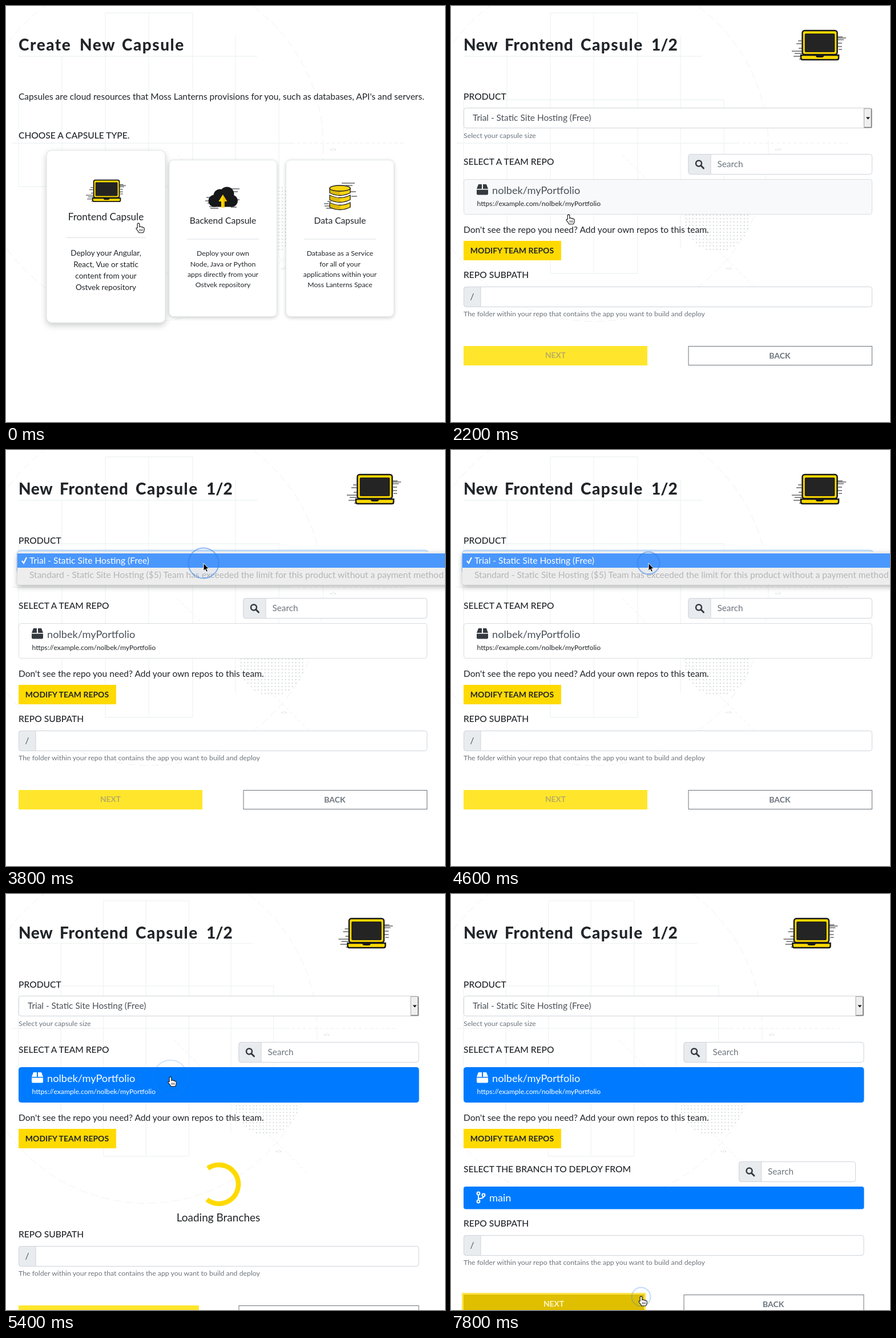
Write an HTML page that moves like this. It is 769x728 px and loops after 8000 ms.

```html
<!DOCTYPE html>
<html lang="en">
<head>
<meta charset="utf-8">
<title>New capsule</title>
<style>
  html, body { margin: 0; width: 100%; height: 100%; overflow: hidden; background: #fff; }
  svg { display: block; width: 769px; height: 728px; font-family: Lato, "Open Sans", sans-serif; }
  text { white-space: pre; }
</style>
</head>
<body>
<svg id="stage" viewBox="0 0 769 728"></svg>
<script>
const LOOP = 8000, STEP = 200;
const INK = '#212529', GREY = '#6c757d', LINE = '#ced4da', YELLOW = '#ffda00', BLUE = '#007bff', BLACK = '#17181a';
const stage = document.getElementById('stage');

// Moments at which the page changes
const PAGE = 1200, REPOS = 1800, PRODUCT = 2200, MENU = 3800, MENU_END = 4800,
      PICKED = 5400, BRANCHES = 5800, HOVER = 7200, PRESSED = 7800;

const CURSOR = [[0, 232, 381], [800, 206, 366], [2800, 206, 366], [3400, 346, 198],
                [4600, 346, 198], [5000, 288, 321], [6400, 288, 321], [7400, 333, 705]];
const CLICKS = [1065, 3450, 4450, 4950, 7730];

const text = (x, y, s, size = 15.5, fill = INK, more = '') =>
  `<text x="${x}" y="${y}" font-size="${size}" fill="${fill}" ${more}>${s}</text>`;
const rect = (x, y, w, h, fill, more = '') =>
  `<rect x="${x}" y="${y}" width="${w}" height="${h}" fill="${fill}" ${more}/>`;
const path = (d, fill = 'none', more = '') => `<path d="${d}" fill="${fill}" ${more}/>`;
const group = (transform, body) => `<g transform="${transform}">${body}</g>`;
const middle = 'text-anchor="middle"';
const bold = 'font-weight="700"';
const label = (y, s) => text(22, y, s, 15.6, INK, 'font-weight="500"');
const box = (x, y, w, h, fill = '#fff', stroke = LINE) =>
  rect(x + .5, y + .5, w - 1, h - 1, fill, `rx="4" stroke="${stroke}"`);

function heading(words) {
  const spans = words.map(([x, w, spacing = 1.5]) => `<tspan x="${x}" letter-spacing="${spacing}">${w}</tspan>`).join('');
  return text(22, 78, spans, 28, INK, 'font-weight="800"');
}

function background(scale) {
  const grid = 'M174 12H327M22 88H440M22 164H478M10 240H500M22 316H440M174 468H327' +
    'M22 164V316M98 88V400M174 12V468M250 12V468M327 12V468M402 53V425M478 164V316';
  let dots = '';
  for (let y = -54; y <= 54; y += 6) {
    const half = Math.floor(Math.sqrt(57 * 57 - y * y) / 6) * 6;
    dots += `M${465 - half} ${372 + y}h${2 * half + 1.5}`;
  }
  const tag = (x, y) => text(x, y, '&lt;/&gt;', 7, '#c4c9cb', middle);
  return group(`scale(${scale})`,
    path(grid, 'none', 'stroke="#f0f4f4" stroke-width="1.3"') +
    '<circle cx="250" cy="246" r="306" fill="none" stroke="#eff1f1" stroke-dasharray="14 7"/>' +
    path('M500 240H700M300 260L540 500', 'none', 'stroke="#eceff0" stroke-dasharray="6 4"') +
    path(dots, 'none', 'stroke="#b9bec1" stroke-width="1.4" stroke-dasharray="1.4 4.6"') +
    tag(573, 254) + tag(548, 363) + tag(487, 462));
}

function laptop(x, y, s) {
  const glitch = 'M-49 10h18M-44 14h14M-46 19h13M-38 -8h6M-41 -3h9M-37 5h6M-36 24h8' +
    'M31 -15h9M31 -10h11M30 -13h16M31 2h8M33 7h6M32 -4h7';
  return group(`translate(${x} ${y}) scale(${s})`,
    path(glitch, 'none', `stroke="${BLACK}" stroke-width="1.2"`) +
    rect(-30.5, -26, 61, 42, YELLOW, `rx="4" stroke="${BLACK}" stroke-width="2.5"`) +
    rect(-25.5, -20, 51, 31, '#242424', `rx="1" stroke="${BLACK}" stroke-width="1.5"`) +
    path('M-33 17H33V22Q33 25 30 25H-30Q-33 25 -33 22Z', YELLOW, `stroke="${BLACK}" stroke-width="2.5"`) +
    path('M-8 16H8Q7 21 4 21H-4Q-7 21 -8 16Z', BLACK));
}

function cloud(x, y) {
  const puffs = [[-15, 6, 10.5], [-5, -3, 11.5], [7, -6, 12.5], [15.5, 6, 10.5]]
    .map(([cx, cy, r]) => `<circle cx="${cx}" cy="${cy}" r="${r}" fill="${BLACK}"/>`).join('');
  return group(`translate(${x} ${y})`,
    path('M-31 6h12M-27 10h10M-29 0h9M-24 16h10M13 -15h16M17 -10h9M18 4h11M-22 19h14M14 17h10',
      'none', `stroke="${BLACK}" stroke-width="1.2"`) +
    puffs + rect(-15, 0, 30.5, 16.5, BLACK) +
    path('M0 -5L7.500 7H3V17.500H-3V7H-7.500Z', '#f0bd00') + path('M0 -5L-7.500 7H-3V17.500H0Z', YELLOW));
}

function database(x, y) {
  const disc = top =>
    path(`M-18 ${top}Q0 ${top + 9} 18 ${top}V${top + 8}Q0 ${top + 17} -18 ${top + 8}Z`,
      '#f7d313', `stroke="${BLACK}" stroke-width="1.3"`) +
    path(`M-17 ${top + 1}Q-10 ${top + 4} 0 ${top + 5}V${top + 12}Q-10 ${top + 11} -17 ${top + 7.5}Z`, '#dcb90f');
  return group(`translate(${x} ${y})`,
    path('M3 -24h23M10 -20h12M18 -9h10M20 -1h10M-27 16h12M-24 20h14M-22 8h7M-28 12h8',
      'none', `stroke="${BLACK}" stroke-width="1.2"`) +
    disc(10) + disc(-3) + disc(-15) +
    `<ellipse cy="-15" rx="18" ry="5" fill="#f7d313" stroke="${BLACK}" stroke-width="1.3"/>`);
}

function card(x, icon, title, lines, shadow = '0 2px 3px rgba(0,0,0,.18)') {
  const cx = x + 95;
  return rect(x + .5, 269.5, 189, 274, '#fff', `rx="8" stroke="#dfe6e7" style="filter:drop-shadow(${shadow})"`) + icon +
    text(cx, 381, title, 15.6, INK, middle) +
    rect(cx - 63, 407.5, 126, 1, '#dcdfe1') +
    lines.map((s, i) => text(cx, 437.3 + i * 18.2, s, 12.3, INK, middle)).join('');
}

function chooser() {
  return heading([[22, 'Create'], [129, 'New'], [203, 'Capsule']]) +
    text(22, 163.5, "Capsules are cloud resources that Moss Lanterns provisions for you, such as databases, API's and servers.") +
    label(231.5, 'CHOOSE A CAPSULE TYPE.') +
    card(285, cloud(380, 335), 'Backend Capsule',
      ['Deploy your own', 'Node, Java or Python', 'apps directly from your', 'Ostvek repository']) +
    card(490, database(585, 334), 'Data Capsule',
      ['Database as a Service', 'for all of your', 'applications within your', 'Moss Lanterns Space']) +
    group('translate(175 403.5) scale(1.1) translate(-175 -406.5)',
      card(80, laptop(176, 334, .67), 'Frontend Capsule',
        ['Deploy your Angular,', 'React, Vue or static', 'content from your', 'Ostvek repository'],
        '0 4px 5px rgba(0,0,0,.2)'));
}

function spinner(x, y, t) {
  const start = -135 + (t - 1400) * .2725;
  const span = 220 - 33 * Math.cos(Math.PI * (t - 1400) / 800);
  return `<circle r="34" fill="none" stroke="${YELLOW}" stroke-width="8.5" pathLength="360"
    stroke-dasharray="${span} 360" transform="translate(${x} ${y}) rotate(${start})"/>`;
}

function addon(x, y, w, h) {
  return path(`M${x + w} ${y + .5}H${x + 4.5}q-4 0 -4 4V${y + h - 4.5}q0 4 4 4H${x + w}Z`, '#e9ecef', `stroke="${LINE}"`);
}

function search(x, y, right) {
  return box(x, y, right - x, 36) + addon(x, y, 39.5, 36) +
    path(`M${x + 22} ${y + 20}l5 5`, 'none', 'stroke="#343a40" stroke-width="3" stroke-linecap="round"') +
    `<circle cx="${x + 18.5}" cy="${y + 16.5}" r="5" fill="none" stroke="#343a40" stroke-width="2.5"/>` +
    text(x + 51, y + 22.5, 'Search', 15.3, GREY);
}

function select(right, focused) {
  const glow = focused ? rect(20, 176, right - 18, 40, 'none', 'rx="6" stroke="#bfdeff" stroke-width="3"') : '';
  const x = right - 15;
  return glow + box(22, 178, right - 22, 36, '#fff', focused ? '#80bdff' : LINE) +
    text(38, 200.5, 'Trial - Static Site Hosting (Free)', 15.4, '#495057') +
    rect(x + .5, 179.5, 13, 33, '#efefef', 'stroke="#a9a9a9"') +
    path(`M${x + 1} 212.5h12.5V180`, 'none', 'stroke="#777" stroke-width="1.5"') +
    path(`M${x + 4} 194.5h7l-3.5 4Z`, '#111');
}

function repoRow(y, right, picked, hovered) {
  const ink = picked ? '#fff' : '#495057';
  const fill = picked ? BLUE : hovered ? '#f8f9fa' : '#fff';
  return box(22, y, right - 22, 62, fill, picked ? BLUE : '#d9dcdf') +
    path(`M48 ${y + 9}h6v8h-9ZM56 ${y + 9}h6l3 8h-9ZM45 ${y + 18.5}h20v7q0 2 -2 2h-16q-2 0 -2 -2Z`, picked ? '#fff' : '#343a40') +
    text(72, y + 25.5, 'nolbek/myPortfolio', 18.2, ink) +
    text(45.5, y + 47, 'https://example.com/nolbek/myPortfolio', 12.2, picked ? '#fff' : INK);
}

function branchList(right) {
  const nodes = [[48, 524], [48, 538], [57, 527]]
    .map(([x, y]) => `<circle cx="${x}" cy="${y}" r="2.4"/>`).join('');
  return label(487, 'SELECT THE BRANCH TO DEPLOY FROM') + search(504, 468, 709) +
    rect(22, 512, right - 22, 39.5, BLUE, 'rx="4"') +
    `<g fill="none" stroke="#fff" stroke-width="2">${nodes}<path d="M48 526.5V535.5M57 529.5Q57 533 48 533"/></g>` +
    text(67, 538, 'main', 18.2, '#fff');
}

function nextButton(y, w, t) {
  const ready = t >= BRANCHES, hover = t >= HOVER;
  const fill = hover ? '#dfbf00' : ready ? YELLOW : '#ffe62c';
  const ink = hover ? '#fff6c8' : ready ? INK : '#b9ad62';
  const glow = t >= PRESSED ? rect(20.5, y - 1.5, w + 3, 37, 'none', 'stroke="#ffe54a" stroke-width="3"') : '';
  return rect(22, y, w, 34, fill) + glow + text(22 + w / 2, y + 21.3, 'NEXT', 13.8, ink, middle + bold);
}

function form(t) {
  const narrow = t >= PICKED, loaded = t >= PRODUCT, repos = t >= REPOS;
  const right = narrow ? 723.5 : 738, mid = narrow ? 407.5 : 415.5;
  const a = loaded ? 0 : 59;
  const b = a - (repos ? 0 : 63);
  const c = b + (t >= BRANCHES ? 106 : narrow ? 125 : 0);
  const hovered = t <= 2800 || t >= 5000;
  let s = heading([[22, 'New', .5], [94, 'Frontend', .8], [227, 'Capsule'], [351, '1/2', 0]]) +
    laptop(narrow ? 631.5 : 646, 69, 1) + label(163.5, 'PRODUCT');
  s += loaded ? select(right, t >= MENU && t < 5200) : spinner(69, 226, t);
  s += text(22, 230.5 + a, 'Select your capsule size', 12.3, GREY) +
    label(277.8 + a, 'SELECT A TEAM REPO') + search(mid, 259 + a, right);
  if (repos) s += repoRow(303 + a, right, narrow, hovered);
  s += text(22, 396.5 + b, "Don't see the repo you need? Add your own repos to this team.", 15.55) +
    rect(22, 411 + b, 171, 34, YELLOW) + text(107, 432.6 + b, 'MODIFY TEAM REPOS', 14, INK, middle + bold);
  if (t >= BRANCHES) s += branchList(right);
  else if (narrow) s += spinner(373, 508, t) + text(372, 572.5, 'Loading Branches', 19, INK, middle);
  s += label(476.3 + c, 'REPO SUBPATH') + box(22, 491 + c, right - 22, 36) + addon(22, 491 + c, 30, 36) +
    text(37, 513.5 + c, '/', 15.5, '#495057', middle) +
    text(22, 543 + c, 'The folder within your repo that contains the app you want to build and deploy', 12.3, GREY) +
    nextButton(595 + c, narrow ? 316 : 322, t) +
    rect(mid + .5, 595.5 + c, right - mid - 1, 33, '#fff', `stroke="${GREY}"`) +
    text((mid + right) / 2 - .8, 616.6 + c, 'BACK', 14, GREY, middle + bold);
  if (t >= MENU && t < MENU_END) s += menu();
  return s;
}

function menu() {
  return rect(20, 178, 770, 58, '#ededee', 'rx="4" style="filter:drop-shadow(0 4px 5px rgba(0,0,0,.28))"') +
    rect(20, 181, 770, 25, '#4a97fd') +
    path('M28 194l3 4l5 -10', 'none', 'stroke="#fff" stroke-width="2.2"') +
    text(41, 199, 'Trial - Static Site Hosting (Free)', 15.6, '#fff') +
    text(41, 223.7, 'Standard - Static Site Hosting ($5) Team has exceeded the limit for this product without a payment method', 15.6, '#b4b4b5');
}

function cursorAt(t) {
  const i = CURSOR.findIndex(p => p[0] > t);
  if (i < 0) return CURSOR.at(-1).slice(1);
  const [t0, x0, y0] = CURSOR[i - 1], [t1, x1, y1] = CURSOR[i];
  const p = (t - t0) / (t1 - t0), e = p * p * (3 - 2 * p);
  return [x0 + (x1 - x0) * e, y0 + (y1 - y0) * e];
}

function pointer(t) {
  const [x, y] = cursorAt(t);
  const hand = t < PAGE || (t >= REPOS && t <= 2800) || (t >= 5000 && t < 6800) || t >= HOVER;
  const click = CLICKS.find(c => t >= c && t < c + 500);
  let ring = '';
  if (click) {
    const p = (t - click) / 500;
    ring = `<circle r="${14 + 18 * p}" fill="#2f7fe8" fill-opacity=".08" stroke="#2f7fe8"
      stroke-width="2" opacity="${Math.sin(Math.PI * p) * .65}"/>`;
  }
  const shape = hand
    ? group('scale(.93)',
        path('M-2 8V1Q-2 -1 0 -1T2 1V6Q4 4 5.500 6.500Q8 5 8.500 7.500Q11 6.500 11 9V11Q11 14 9 17H1Q-1 13 -4 10Q-5 7 -2 8Z',
          '#fff', 'stroke="#111" stroke-width="1.2"') +
        path('M2.500 10V14M5 10V14M7.500 10V14', 'none', 'stroke="#111" stroke-width=".9"'))
    : path('M0 0V13.500L3 10.700L5 15.300L7.400 14.300L5.400 9.800H9.300Z', '#000', 'stroke="#fff" stroke-width="1"');
  return group(`translate(${x} ${y})`, ring + shape);
}

function draw(t) {
  stage.innerHTML = background(t >= PICKED ? 754 / 769 : 1) + (t < PAGE ? chooser() : form(t)) + pointer(t);
}

const began = performance.now();
let shown = -1;
function tick() {
  const t = Math.floor((performance.now() - began) % LOOP / STEP) * STEP;
  if (t !== shown) draw(shown = t);
  requestAnimationFrame(tick);
}
tick();
</script>
</body>
</html>
```
